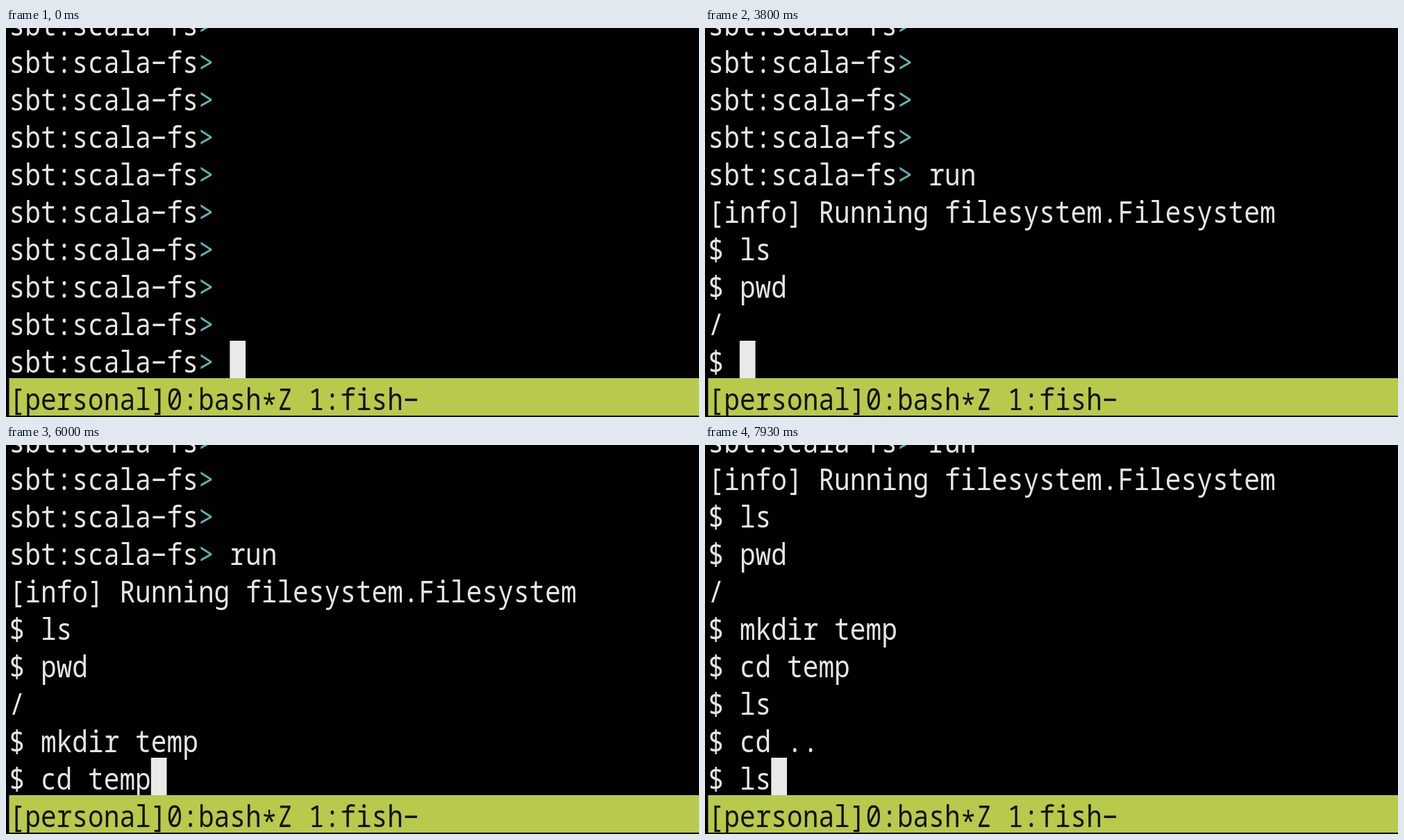
Write an HTML page with a canvas that moves like this. It is 998 px wide and 561 px high and loops after 8 s.

```html
<!DOCTYPE html>
<html lang="en">
<head>
<meta charset="utf-8">
<title>Terminal session</title>
<style>
html, body { margin: 0; width: 100%; height: 100%; overflow: hidden; background: #000; }
canvas { display: block; width: 998px; height: 561px; }
</style>
</head>
<body>
<canvas id="stage" width="998" height="561"></canvas>
<script>
const LOOP = 8000;
const LEFT = 4.5, CELL = 22.7, ROW = 53.95, LAST_TOP = 451, BASE = 46;
const WHITE = '#e6e6e6', TEAL = '#62b5b0', LIME = '#b9c94b', INK = '#10120a';
const PROMPT = 'sbt:scala-fs> ';
const STATUS = '[personal]0:bash*Z 1:fish-';

const ctx = document.getElementById('stage').getContext('2d');
ctx.font = '500 43px "Noto Sans Mono", "DejaVu Sans Mono", monospace';
ctx.textAlign = 'center';
const squeeze = CELL / ctx.measureText('0').width;

const events = [];
const put = (time, text) => events.push([time, text]);
const type = (time, text, step) =>
  [...text].forEach((ch, i) => put(time + Math.floor(i * step), ch));

put(0, (PROMPT + '\n').repeat(11) + PROMPT);
put(800, 'r');
put(930, 'un');
put(1130, '\n');
put(1270, '[info] Running filesystem.Filesystem\n$ ');
type(3130, 'ls', 70);
put(3330, '\n$ ');
type(3600, 'pwd', 66.7);
put(3800, '\n/\n$ ');
type(4530, 'mkdir tem', 92.5);
put(5400, 'p');
put(5470, '\n$ ');
type(5600, 'cd temp', 66.7);
put(6070, '\n$ ');
type(6270, 'ls', 60);
put(6470, '\n');
put(6600, '$ ');
type(7270, 'cd ', 65);
put(7530, '..');
put(7670, '\n$ ');
type(7870, 'ls', 60);

function drawChar(ch, col, top, color) {
  ctx.save();
  ctx.translate(LEFT + (col + 0.5) * CELL, top + BASE + (ch === '*' ? 8 : 0));
  ctx.scale(squeeze, 1);
  ctx.fillStyle = color;
  ctx.fillText(ch === '-' ? '\u2212' : ch, 0, 0);
  ctx.restore();
}

function drawLine(text, top, color) {
  [...text].forEach((ch, col) => {
    if (ch !== ' ') drawChar(ch, col, top, ch === '>' ? TEAL : color);
  });
}

function draw(count) {
  const lines = events.slice(0, count).map(e => e[1]).join('').split('\n').slice(-11);
  ctx.fillStyle = '#000';
  ctx.fillRect(0, 0, 998, 561);
  ctx.filter = 'blur(0.6px)';
  lines.forEach((line, i) =>
    drawLine(line, LAST_TOP - (lines.length - 1 - i) * ROW, WHITE));
  ctx.fillStyle = '#e9e9e9';
  ctx.fillRect(LEFT + lines[lines.length - 1].length * CELL, LAST_TOP, CELL, 54);
  ctx.fillStyle = LIME;
  ctx.fillRect(LEFT, 505, 1000, 54);
  drawLine(STATUS, 505, INK);
  ctx.filter = 'none';
}

let shown = 0;
function tick() {
  const time = performance.now() % LOOP;
  const count = events.filter(e => e[0] <= time).length;
  if (count !== shown) draw(shown = count);
  requestAnimationFrame(tick);
}
tick();
</script>
</body>
</html>
```
